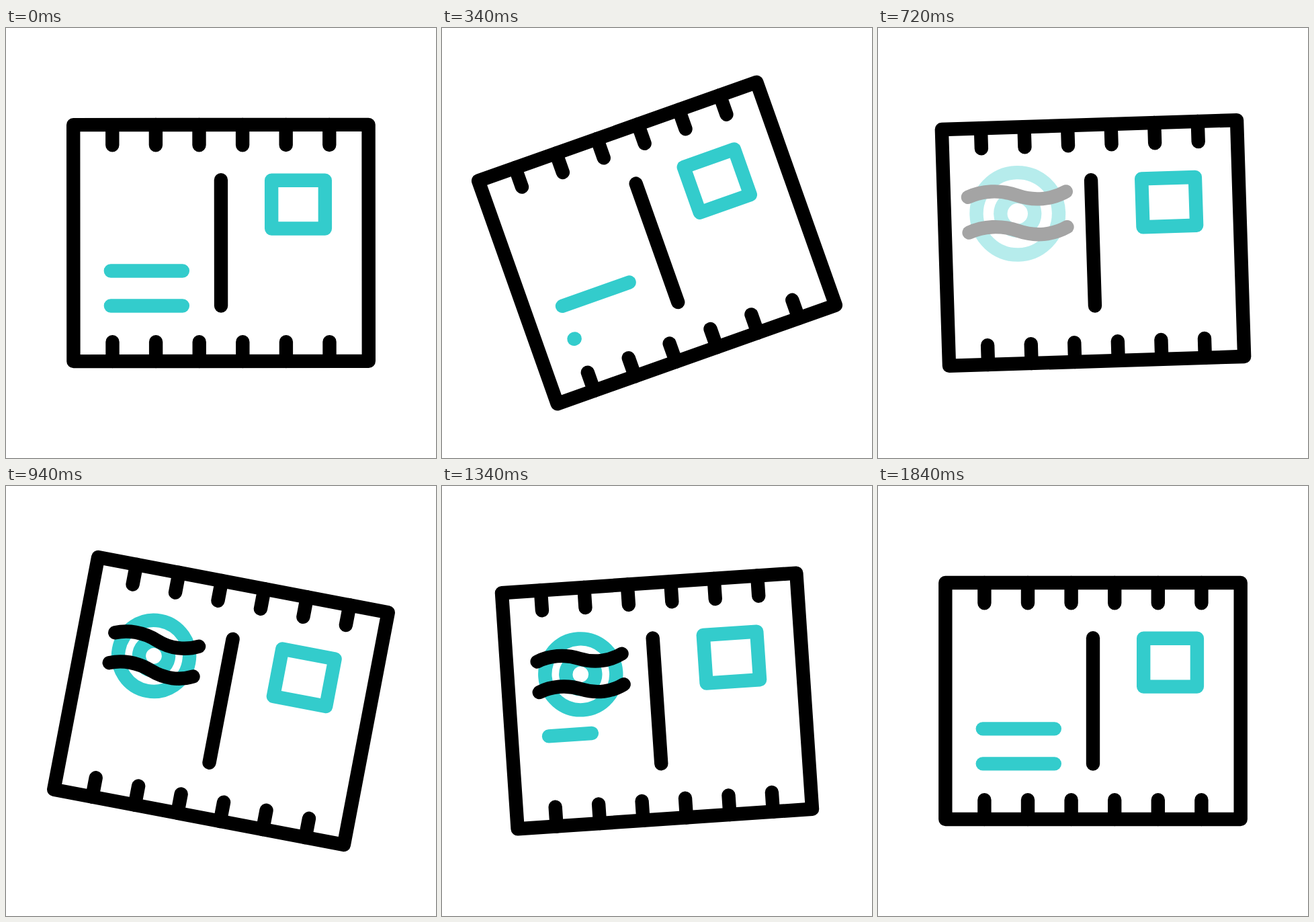
An HTML page that plays this animation: 640x640 px, repeating every 2400 ms.

```html
<!DOCTYPE html>
<html lang="en">
<head>
<meta charset="utf-8">
<title>Postcard</title>
<style>
  html, body { margin: 0; width: 100%; height: 100%; overflow: hidden; background: #fff; }
  svg { display: block; width: 100%; height: 100%; }
  svg * { fill: none; stroke-linecap: round; stroke-linejoin: round; }
  .ink { stroke: #000; }
  .teal { stroke: #3cc; }
</style>
</head>
<body>
<svg viewBox="0 0 640 640" stroke-width="20.4">
  <g id="card">
    <rect class="ink" x="100.3" y="144" width="439.4" height="352"/>
    <path class="ink" id="ticks"/>
    <path class="ink" d="M320 226.2V413.5"/>
    <rect class="teal" x="395.2" y="226.8" width="79.7" height="71.8"/>
    <path class="teal" id="line1"/>
    <path class="teal" id="line2"/>
    <g id="stamp">
      <circle class="teal" r="53"/>
      <circle class="teal" r="22"/>
      <path class="ink" d="M-63.2-23.2C-45-31-22-32 0-23.5C22-15 45-17 63.2-26.5"/>
      <path class="ink" d="M-63.2 22.5C-45 14.7-22 13.7 0 22.2C22 30.7 45 28.7 63.2 19.2"/>
    </g>
  </g>
</svg>
<script>
  const LOOP = 2400, STEP = 20, STROKE = 20.4;
  const $ = id => document.getElementById(id);

  // Tracks of [time in ms, value], eased between neighbours
  const swing = [[-12, 0], [512, -26.1], [868, 12.75], [1238, -7.05], [1506, 2.8], [1840, 0]];
  const upper = [[320, 1], [620, 0], [1170, 0], [1470, 1]];
  const lower = [[60, 1], [360, 0], [1388, 0], [1688, 1]];
  const ink = [[600, 0], [900, 1], [1350, 1], [1650, 0]];

  const ease = s => s * s * (3 - 2 * s);

  function at(track, t) {
    if (t <= track[0][0]) return track[0][1];
    for (let i = 1; i < track.length; i++) {
      const [t0, a] = track[i - 1], [t1, b] = track[i];
      if (t < t1) return a + (b - a) * ease((t - t0) / (t1 - t0));
    }
    return track[track.length - 1][1];
  }

  function drawLine(el, y, part) {
    el.setAttribute("d", part > 0.001 ? `M155.8 ${y}h${107 * part}` : "");
  }

  function draw(t) {
    $("card").setAttribute("transform", `rotate(${at(swing, t)} 320 320)`);
    drawLine($("line1"), 361.4, at(upper, t));
    drawLine($("line2"), 413.4, at(lower, t));

    // The stamp grows as it fades, but its strokes keep their weight
    const alpha = at(ink, t), scale = 1 + 0.24 * (1 - alpha);
    const stamp = $("stamp");
    stamp.setAttribute("transform", `translate(209.2 272.8) scale(${scale})`);
    stamp.setAttribute("stroke-width", STROKE / scale);
    stamp.setAttribute("opacity", alpha);
  }

  let ticks = "";
  for (let i = 0; i < 6; i++) {
    const x = 158.4 + 64.6 * i;
    ticks += `M${x} 144V174.2M${x} 467.2V496`;
  }
  $("ticks").setAttribute("d", ticks);

  const start = performance.now();
  function frame() {
    const t = (performance.now() - start) % LOOP;
    draw(Math.floor(t / STEP) * STEP);
    requestAnimationFrame(frame);
  }
  draw(0);
  requestAnimationFrame(frame);
</script>
</body>
</html>
```
